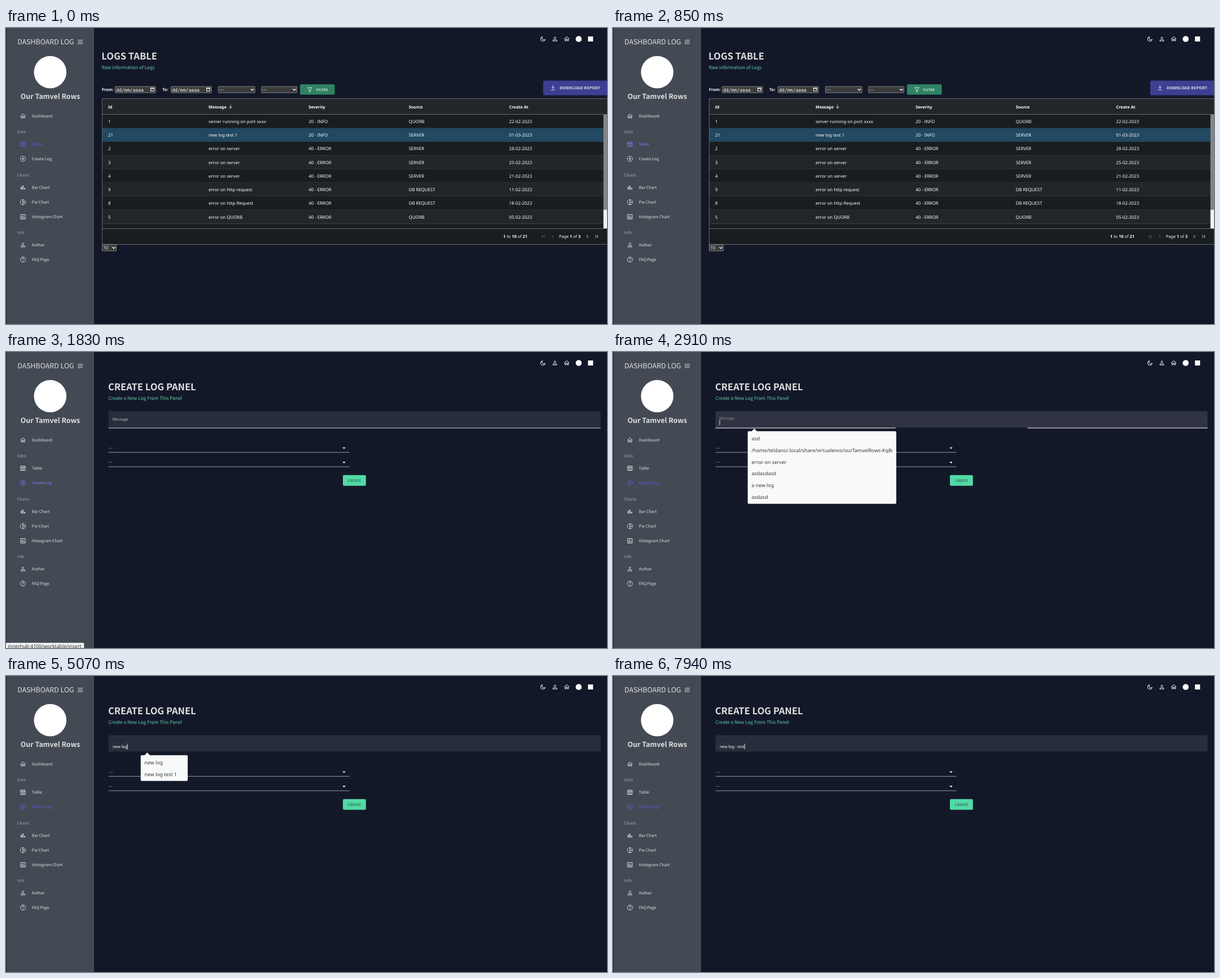
These frames come from a looping animation (1065 px wide and 526 px high, 8 s). An HTML page:

```html
<!DOCTYPE html>
<html lang="en">
<head>
<meta charset="utf-8">
<title>Log dashboard</title>
<style>
  html, body { margin: 0; width: 100%; height: 100%; overflow: hidden; background: #131829; }
  svg { display: block; width: 1065px; height: 526px; }
  text { white-space: pre; text-rendering: geometricPrecision; }
  .ui { font-family: "Noto Sans CJK JP", "Noto Sans CJK SC", "Noto Sans CJK", "Open Sans", sans-serif; }
  .grid { font-family: "Noto Sans", "Open Sans", sans-serif; }
  .mono { font-family: "DejaVu Sans Mono", monospace; }
</style>
</head>
<body>
<svg id="stage" viewBox="0 0 1065 526" xmlns="http://www.w3.org/2000/svg"></svg>
<script>
const LOOP = 8000;
const PALE = '#e0e0e0', WHITE = '#ffffff', BACK = '#131829';
const ACTIVE = [98, 90, 226], HOVER = [128, 121, 243], PLAIN = [224, 224, 224];

const ICONS = {
  menu: 'M3 6h18M3 12h18M3 18h18',
  home: 'M3.2 12.2 12 4.3l8.8 7.9M6 10.5V19h4v-6h4v6h4v-8.5',
  table: 'M4 4.5h16V20H4zM4 9h16M9.5 9v11M14.5 9v11',
  plus: 'M12 3a9 9 0 1 0 .01 0zM12 7.5v9M7.5 12h9',
  bars: 'M6 9v10M12 5v14M18 13v6',
  pie: 'M12 3a9 9 0 1 0 .01 0zM12 3v18M12 12h9',
  histogram: 'M4 4h16v16H4zM8 10v7M12 7v10M16 13v4',
  person: 'M12 5a3 3 0 1 0 .01 0zM5 19v-2c0-2 4-3 7-3s7 1 7 3v2z',
  help: 'M12 3a9 9 0 1 0 .01 0zM9.2 9.5a2.8 2.8 0 1 1 4.5 2.2c-1.2.9-1.7 1.3-1.7 2.6M12 16v2',
  moon: 'M10.7 4.2A8 8 0 1 0 19.8 13.3A6.4 6.4 0 0 1 10.7 4.2z',
  download: 'M12 3v11M7 10l5 5 5-5M5 20h14',
  funnel: 'M4 5h16l-6.500 8.500V20h-3v-6.500z',
  down: 'M12 4v15M6 13l6 6 6-6',
  left: 'M15 6l-6 6 6 6',
  right: 'M9 6l6 6-6 6',
  first: 'M18 6l-6 6 6 6M7 6v12',
  last: 'M6 6l6 6-6 6M17 6v12',
  caret: 'M6 9l6 6 6-6'
};

const attrs = o => Object.entries(o).map(([k, v]) => ` ${k}="${v}"`).join('');
const rect = (x, y, width, height, fill, more = {}) =>
  `<rect${attrs({ x, y, width, height, fill, ...more })}/>`;
const line = (x1, y, x2, stroke, more = {}) =>
  `<line${attrs({ x1, y1: y, x2, y2: y, stroke, ...more })}/>`;
// y is the middle of the capitals
const text = (x, y, size, str, fill = PALE, more = {}) =>
  `<text${attrs({ x, y: (y + size * 0.36).toFixed(2), 'font-size': size, fill, class: 'ui', ...more })}>${str}</text>`;
const icon = (name, x, y, color = PALE, scale = 0.5, width = 2) =>
  `<path${attrs({
    d: ICONS[name], fill: 'none', stroke: color, 'stroke-width': width,
    transform: `translate(${x} ${y}) scale(${scale}) translate(-12 -12)`
  })}/>`;
const group = (id, body, more = {}) => `<g${attrs({ id, ...more })}>${body}</g>`;

const BOLD = { 'font-weight': 700 };
const GRID = { class: 'grid' };
const GRID_BOLD = { ...GRID, ...BOLD };

function menuItem(id, name, label, y) {
  const body = icon(name, 30, y + 0.5, 'currentColor', 0.5, name === 'bars' ? 3.4 : 2)
    + text(45.7, y, 7.2, label, 'currentColor');
  return group(id, body, { color: PALE });
}

function sidebar() {
  const heads = [['Data', 184.5], ['Charts', 261], ['Info', 363]];
  const items = [
    ['home', 'Dashboard', 156], ['table', 'Table', 206], ['plus', 'Create Log', 232],
    ['bars', 'Bar Chart', 283], ['pie', 'Pie Chart', 309], ['histogram', 'Histogram Chart', 335],
    ['person', 'Author', 385], ['help', 'FAQ Page', 411]
  ];
  return rect(0, 0, 156, 526, '#434a54') + rect(0, 0, 1, 526, '#191c24')
    + text(20.3, 24.5, 12.4, 'DASHBOARD LOG') + icon('menu', 131.5, 24.7, PALE, 0.5, 2.2)
    + `<circle cx="78.3" cy="78.5" r="28.8" fill="${WHITE}"/>`
    + text(78.5, 121.3, 12.4, 'Our Tamvel Rows', PALE, { ...BOLD, 'text-anchor': 'middle' })
    + heads.map(([s, y]) => text(19.8, y, 7.15, s, '#a3a6aa')).join('')
    + items.map(([name, s, y]) => menuItem('item-' + name, name, s, y)).join('');
}

function topBar() {
  return icon('moon', 951.5, 19.5, WHITE) + icon('person', 972.6, 19.5, WHITE)
    + icon('home', 993.7, 19.3, WHITE)
    + `<circle cx="1014.8" cy="19.5" r="5.3" fill="${WHITE}"/>`
    + rect(1031.3, 15, 9, 9, WHITE);
}

const box = (x, y, w, h) =>
  rect(x + 0.5, y + 0.5, w - 1, h - 1, '#3b3b3b', { stroke: '#858585', rx: 0.5 });

function dateInput(x) {
  return box(x, 103.5, 72.5, 12)
    + text(x + 2.2, 109.6, 8.1, 'dd/mm/aaaa', WHITE, { class: 'mono' })
    + rect(x + 63.5, 106.7, 5.6, 5.2, 'none', { stroke: WHITE })
    + line(x + 63, 107, x + 69.6, WHITE, { 'stroke-width': 1.5 });
}

function dropDown(x, y, w, label) {
  return box(x, y, w, 12) + text(x + 2.5, y + 6, 7.6, label, WHITE, GRID)
    + icon('caret', x + w - 5, y + 6, WHITE, 0.42, 3);
}

function tablePage() {
  const cols = [181, 359, 536.2, 713.8, 891.5];
  const heads = ['Id', 'Message', 'Severity', 'Source', 'Create At'];
  const info = '20 - INFO', error = '40 - ERROR';
  const rows = [
    ['1', 'server running on port xxxx', info, 'QUORB', '22-02-2023'],
    ['21', 'new log test 1', info, 'SERVER', '01-03-2023'],
    ['2', 'error on server', error, 'SERVER', '28-02-2023'],
    ['3', 'error on server', error, 'SERVER', '25-02-2023'],
    ['4', 'error on server', error, 'SERVER', '21-02-2023'],
    ['9', 'error on http request', error, 'DB REQUEST', '11-02-2023'],
    ['8', 'error on http Request', error, 'DB REQUEST', '18-02-2023'],
    ['5', 'error on QUORB', error, 'QUORB', '05-02-2023']
  ];
  const step = 24.22, top = 153.9;
  let out = text(169.3, 50.5, 16.5, 'LOGS TABLE', PALE, BOLD)
    + text(169.7, 70.5, 8.3, 'Raw information of Logs', '#62d0a8')
    + text(170, 109.5, 7.1, 'From:', WHITE, BOLD) + dateInput(193)
    + text(277, 109.5, 7.1, 'To:', WHITE, BOLD) + dateInput(292)
    + dropDown(376, 103.5, 65.5, '---') + dropDown(452.3, 103.5, 63.7, '---')
    + rect(521, 100, 61.5, 18.5, '#2d8263', { rx: 2 })
    + icon('funnel', 538.5, 109.3, PALE)
    + text(549.8, 109.5, 5.9, 'FILTER', PALE, { ...BOLD, 'letter-spacing': 0.2 })
    + rect(952, 93.5, 116, 26, '#3d3f93', { rx: 2 })
    + icon('download', 969.3, 106, PALE)
    + text(981, 106.3, 6.9, 'DOWNLOAD REPORT', PALE, { ...BOLD, 'letter-spacing': 0.2 });

  out += rect(170, 125, 895, 260, '#181d1f') + rect(170, 126, 895, 27.5, '#222628');
  out += heads.map((s, i) => text(cols[i], 140, 7.3, s, WHITE, GRID_BOLD)).join('');
  out += icon('down', 398, 139.8, WHITE, 0.42);
  rows.forEach((row, i) => {
    const y = top + i * step;
    const fill = i === 1 ? '#224862' : i % 2 ? '#222628' : '#181d1f';
    out += rect(170, y, 889, step, fill) + line(170, y + step, 1059, '#3c4043');
    out += row.map((s, c) => text(cols[c], y + 12.3, 7.8, s, WHITE, GRID)).join('');
  });
  out += line(170, 153.5, 1065, '#68686e') + line(170, 356.5, 1065, '#68686e');
  out += rect(1058.7, 154, 6.3, 169, '#858585') + rect(1058.7, 323, 6.3, 33, '#f1f1f1');
  out += rect(170.5, 125.5, 896, 259, 'none', { stroke: '#68686e' });

  const strong = s => `<tspan font-weight="700">${s}</tspan>`;
  const grey = '#777b7d';
  out += text(881, 370.5, 7.4, `${strong(1)} to ${strong(10)} of ${strong(21)}`, WHITE, GRID)
    + icon('first', 952.5, 370.5, grey, 0.42) + icon('left', 969, 370.5, grey, 0.42)
    + text(980, 370.5, 7.3, `Page ${strong(1)} of ${strong(3)}`, WHITE, GRID)
    + icon('right', 1030, 370.5, WHITE, 0.42) + icon('last', 1046.2, 370.5, WHITE, 0.42);
  return out + dropDown(170, 384.5, 26, '10');
}

function createPage() {
  const select = y => text(181.8, y, 7.15, '---')
    + line(181.7, y + 8, 608.7, '#b9bbc1', { 'stroke-width': 0.8 })
    + `<path d="M596.3 ${y - 0.8}h5.4l-2.700 2.800z" fill="${WHITE}"/>`;
  return text(181, 62, 16.5, 'CREATE LOG PANEL', PALE, BOLD)
    + text(181.5, 82, 8.3, 'Create a New Log From This Panel', '#62d0a8')
    + `<path id="field" d="M181.6 135.300V107.500q0-2.300 2.300-2.300h867.400q2.300 0 2.300 2.300V135.300z" fill="${WHITE}"/>`
    + line(617.8, 134.9, 617.8, BACK, { id: 'focus', 'stroke-width': 1.2 })
    + '<path id="under" fill="none"/>'
    + text(0, 0, 7, 'Message', PALE, { id: 'label' })
    + text(188.9, 125.3, 7.15, '', WHITE, { id: 'typed' })
    + rect(0, 120.3, 0.8, 10, WHITE, { id: 'cursor' })
    + select(170.3) + select(195.9)
    + rect(597, 218.7, 40.8, 19.1, '#52d9a5', { rx: 2 })
    + text(606, 228.4, 6.2, 'CREATE', '#20363a', { 'letter-spacing': 0.2, 'font-weight': 500 });
}

const $ = id => document.getElementById(id);
$('stage').innerHTML = '<clipPath id="cut"><rect x="240" y="140" width="255.300" height="140"/></clipPath>'
  + rect(0, 0, 1065, 526, BACK) + rect(156, 524.5, 909, 1.5, '#0f1220')
  + sidebar() + topBar()
  + group('tablePage', tablePage()) + group('createPage', createPage())
  + group('popup', '')
  + group('status', rect(-3, 516.8, 141.3, 14, '#eff0f1', { rx: 2 })
    + text(3.3, 522.7, 8.7, 'innerhub:4100/worktable/insert', '#333638', GRID));

// Time-driven values
const ramp = (t, from, to) => Math.min(1, Math.max(0, (t - from) / (to - from)));
const mix = (a, b, k) => a + (b - a) * k;
const blend = (a, b, k) => `rgb(${a.map((v, i) => Math.round(mix(v, b[i], k)))})`;

// cubic-bezier(0, 0, .2, 1)
function easeOut(x) {
  let lo = 0, hi = 1;
  for (let i = 0; i < 24; i++) {
    const s = (lo + hi) / 2;
    if (0.6 * s * s * (1 - s) + s ** 3 < x) lo = s; else hi = s;
  }
  return 3 * lo * lo * (1 - lo) + lo ** 3;
}

const OPEN = 1520, FOCUS = 2894, CLOSE = 5850;
const PHRASE = 'new log - test';
const KEYS = [3890, 4060, 4260, 4360, 4460, 4600, 5070, 5540, 5850, 6190, 6250, 6460, 6590, 6730];
const LISTS = [
  [FOCUS, 502, ['asd', '/home/teldano/.local/share/virtualenvs/ourTamvelRows-KqBd81',
    'error on server', 'asdasdasd', 'a new log', 'asdasd']],
  [3890, 328.7, ['new log', 'new log test 1', 'new new new log']],
  [4460, 322, ['new log', 'new log test 1']],
  [5540, 322, ['new log test 1']]
];

const show = (id, on) => $(id).setAttribute('visibility', on ? 'visible' : 'hidden');
const set = (id, o) => Object.entries(o).forEach(([k, v]) => $(id).setAttribute(k, v));

let shownList = null;
function drawPopup(t) {
  const list = LISTS.filter(([at]) => t >= at).pop();
  set('popup', { opacity: list ? 1 - ramp(t, CLOSE, 6000) : 0 });
  if (!list || list === shownList) return;
  shownList = list;
  const [, right, rows] = list;
  $('popup').innerHTML = `<path d="M245 141.500l5.300-5.500 5.300 5.500z" fill="#f8faf9"/>`
    + rect(238.7, 140.7, right - 238.7, rows.length * 20.8 + 4.3, '#f8faf9', { rx: 2 })
    + group('rows', rows.map((s, i) => text(245.6, 153.8 + i * 20.8, 8.75, s, '#34383a', GRID)).join(''),
      { 'clip-path': 'url(#cut)' });
}

function drawField(t) {
  const k = easeOut(ramp(t, FOCUS, FOCUS + 200));
  const hover = ramp(t, 2500, 2700);
  const size = mix(7, 5.25, k);
  const left = 617.6 - 436 * k, right = 617.6 + 436 * k;
  set('field', { 'fill-opacity': 0.09 + 0.04 * hover * (1 - k) });
  set('focus', { x1: left, x2: right });
  set('under', {
    d: k < 1 ? `M181.6 135.100H${left}M${right} 135.100H1053.6` : '',
    stroke: blend([201, 202, 207], [255, 255, 255], hover)
  });
  set('label', {
    x: 188.7, y: mix(119.7, 113.2, k) + size * 0.36, 'font-size': size,
    fill: blend([190, 193, 198], [27, 32, 50], k)
  });
  const count = KEYS.filter(at => t >= at).length;
  $('typed').textContent = PHRASE.slice(0, count);
  const since = t - (count ? KEYS[count - 1] : FOCUS);
  const lit = t >= FOCUS && Math.floor(since / 602) % 2 === 0;
  set('cursor', {
    x: 188.7 + (count ? $('typed').getComputedTextLength() : 0),
    opacity: lit ? 1 : 0
  });
}

function draw(t) {
  const created = t >= OPEN;
  show('tablePage', !created);
  show('createPage', created);
  const tableHover = ramp(t, 140, 370) * (1 - ramp(t, 900, 1100));
  const createHover = ramp(t, 1050, 1250) * (1 - ramp(t, 2350, 2550));
  set('item-table', { color: created ? PALE : blend(ACTIVE, HOVER, tableHover) });
  set('item-plus', { color: blend(created ? ACTIVE : PLAIN, HOVER, createHover) });
  set('status', { opacity: ramp(t, 1100, 1220) * (1 - ramp(t, 2380, 2500)) });
  drawField(t);
  drawPopup(t);
}

const start = performance.now();
function tick() {
  draw((performance.now() - start) % LOOP);
  requestAnimationFrame(tick);
}
tick();
</script>
</body>
</html>
```
